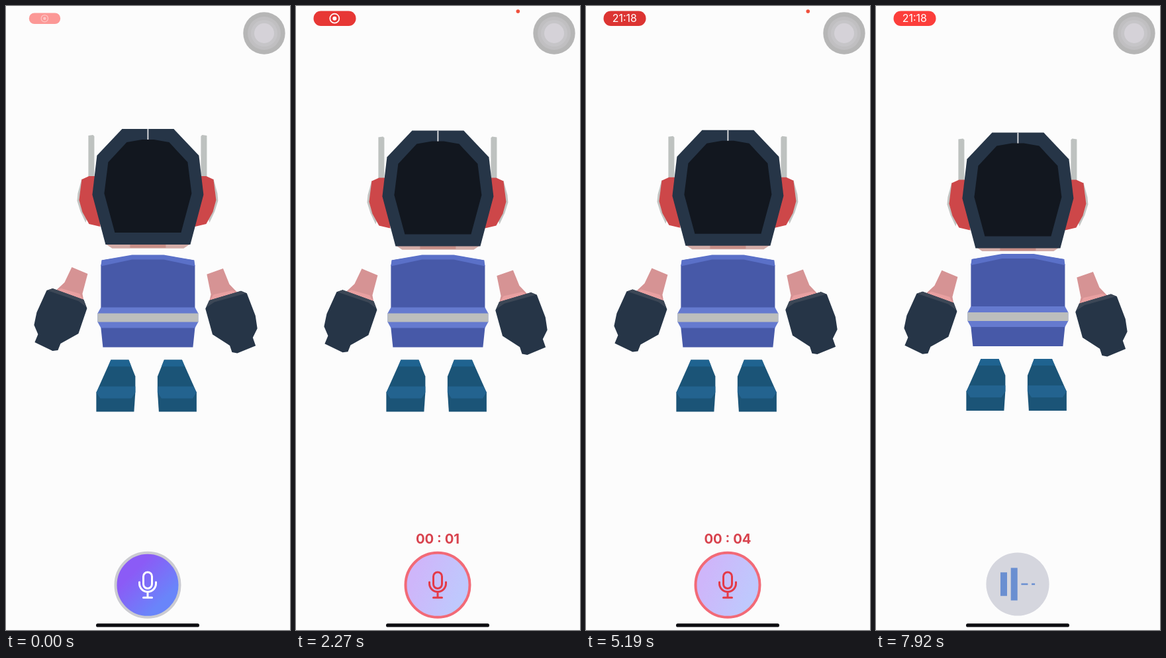
Animation of 429x939 px, one loop 7990 ms. Source, as an HTML page:

```html
<!DOCTYPE html>
<html lang="en">
<head>
<meta charset="utf-8">
<title>Voice robot</title>
<style>
  html, body { margin: 0; width: 100%; height: 100%; overflow: hidden; background: #fcfcfc; }
  svg { display: block; width: 100%; height: 100%; }
  text { font-family: Inter, "Liberation Sans", sans-serif; text-anchor: middle; }
</style>
</head>
<body>
<svg viewBox="0 0 429 939" xmlns="http://www.w3.org/2000/svg">
  <defs>
    <linearGradient id="violet" x1="0.15" y1="0.15" x2="0.85" y2="0.85">
      <stop offset="0.2" stop-color="#8b5bf6"/><stop offset="0.85" stop-color="#6985fa"/>
    </linearGradient>
    <linearGradient id="pale" x1="0" y1="0.3" x2="1" y2="0.7">
      <stop offset="0.15" stop-color="#ceb6fa"/><stop offset="0.85" stop-color="#bfc8fd"/>
    </linearGradient>
    <g id="mic" fill="none" stroke-width="3" stroke-linecap="round">
      <rect x="207.5" y="852" width="13" height="24.5" rx="6.5"/>
      <path d="M201.5 867v2a12.5 12.5 0 0 0 25 0v-2M214 882v8M207.5 890.3h13"/>
    </g>
  </defs>
  <rect width="429" height="939" fill="#fcfcfc"/>

  <g id="robot">
    <g id="body">
      <g id="leg">
        <path fill="#1b5477" d="M158 532h27l10 25v23l-2 30h-57v-29z"/>
        <path fill="#1f6390" d="M158 532h27l4 10h-35z"/>
        <path fill="#23638f" d="M141 572h54v9l-6 9h-47l-6-9z"/>
      </g>
      <use href="#leg" transform="translate(423.5) scale(-1 1)"/>
    </g>
    <g id="chin"></g>
    <g id="arms">
      <g id="arm">
        <path fill="#d69394" d="M99 392l24 10-8 30 2 11-43-15 14-13z"/>
        <path fill="#e9a0a1" d="M74 428l9-4 28 8 6 11z"/>
        <path fill="#263547" d="M61 427l9-3 47 17 5 13-13 38-27 15-4 10-8 1-27-13 5-12-6-14 4-19z"/>
        <path fill="#3c4756" d="M62 427l8-3 47 17 4 11-12-9z"/>
      </g>
      <use href="#arm" transform="rotate(3.4 342 445) translate(423.5 3) scale(-1 1)"/>
    </g>
    <g id="head">
      <g id="ear">
        <path fill="#bec2c0" d="M124 194l7-1 2 2v63h-9z"/>
        <path fill="#c3c5c3" d="M114 259l-6 22-1 11 5 16 8 17 10-35z"/>
        <path fill="#cd4749" d="M114 260l11-5h17v76l-17-4-10-18-5-18z"/>
      </g>
      <use href="#ear" transform="translate(427) scale(-1 1)"/>
    </g>
  </g>

  <g id="pill">
    <rect id="pillBg" x="26.5" y="7.5" width="64" height="22.5" rx="11"/>
    <g id="recIcon">
      <circle cx="58.3" cy="18.7" r="7" fill="none" stroke="#fff" stroke-width="1.7"/>
      <circle cx="58.3" cy="18.7" r="3" fill="#fff"/>
    </g>
    <text id="clock" x="58.3" y="24.4" font-size="16" fill="#fff">21:18</text>
  </g>
  <circle id="dot" cx="335.3" cy="8" r="2.8" fill="#f0503c"/>

  <g id="assist"></g>

  <g id="idle">
    <circle cx="214" cy="871.3" r="48.5" fill="url(#violet)" stroke="#cbcbd1" stroke-width="4"/>
    <use href="#mic" stroke="#fff"/>
  </g>
  <g id="rec">
    <circle cx="214" cy="871.3" r="48.5" fill="url(#pale)" stroke="#f26a77" stroke-width="4"/>
    <use href="#mic" stroke="#e43a48"/>
    <text id="timer" x="214" y="809" font-size="20.3" font-weight="700" fill="#d8434e"></text>
  </g>
  <g id="think">
    <circle cx="214" cy="870" r="47.6" fill="#d5d6de"/>
  </g>
  <rect x="136" y="929.3" width="156" height="5.2" rx="2.6" fill="#0d0d11"/>
</svg>

<script>
const LOOP = 7990, TAP = 1100, STOP = 5900, MID = 214;
const BLUE = '#4759a8', LIGHT = '#657acf';
const $ = id => document.getElementById(id);

function add(parent, tag, attrs) {
  const el = document.createElementNS('http://www.w3.org/2000/svg', tag);
  for (const k in attrs) el.setAttribute(k, attrs[k]);
  return $(parent).appendChild(el);
}

// Mirrored polygon from its right half, given as [distance from the middle, y].
function mirror(parent, fill, ...half) {
  const right = half.map(([dx, y]) => [MID + dx, y]);
  const left = half.map(([dx, y]) => [MID - dx, y]).reverse();
  add(parent, 'polygon', { fill, points: [...right, ...left].join(' ') });
}

mirror('body', BLUE, [24, 375], [69, 382], [71, 390], [71, 484], [68, 513]);
mirror('body', '#5a70c8', [24, 374], [70, 382], [71, 391], [24, 381]);
mirror('body', LIGHT, [71, 453], [76, 462], [76, 475], [71, 484]);
mirror('body', '#bcbebd', [76, 462], [76, 475]);

mirror('chin', '#d3aca7', [64, 350], [63, 358], [54, 364]);
mirror('chin', '#c68d86', [27, 356], [27, 363]);

mirror('head', '#263547', [39, 184], [77, 224], [84, 283], [64, 358]);
mirror('head', '#12171f', [9, 200], [32, 204], [60, 234], [66, 281], [50, 340]);
mirror('head', '#e4e4e6', [0.9, 184], [0.9, 200]);

['#b6b6b6', '#c0bfc1', '#c6c5c8', '#d5d2d8'].forEach((fill, i) =>
  add('assist', 'circle', { cx: 390, cy: 41, r: i ? 30 - 5 * i : 31.7, fill }));

const bars = [0, 1, 2, 3].map(i =>
  add('think', 'rect', { x: 188 + 15.7 * i, width: i < 3 ? 10 : 5, fill: '#6a8fd1' }));

const clamp = x => Math.min(1, Math.max(0, x));
const ramp = (t, start, len) => { const x = clamp((t - start) / len); return x * x * (3 - 2 * x); };
const show = (id, o) => $(id).setAttribute('opacity', o);
const move = (id, y, x = 0) => $(id).setAttribute('transform', `translate(${x} ${y})`);

// Float phase in degrees: the pace changes with the mode.
const PACE = [[0, 67], [TAP, 287], [2270, 414], [3860, 760], [5190, 1021], [LOOP, 1797]];
function floatY(t) {
  const i = PACE.findIndex(([end]) => t < end);
  const [t0, a] = PACE[i - 1], [t1, b] = PACE[i];
  const deg = a + (b - a) * (t - t0) / (t1 - t0);
  return -5 + 13 * Math.cos(deg * Math.PI / 180);
}

// Level bar: quick rise over 65 degrees, then a slow fall.
function level(deg) {
  const p = ((deg + 65) % 360 + 360) % 360 - 65;
  if (p < 0) return (1 - Math.cos(Math.PI * (p + 65) / 65)) / 2;
  return p < 180 ? (1 + Math.cos(p * Math.PI / 180)) / 2 : 0;
}

function draw(t) {
  const y = floatY(t);
  move('head', y + 0.5);
  move('arms', y * 0.9 + 0.5);
  move('chin', y * 0.82 + 0.2);
  move('robot', 0.5 - 1.5 * ramp(t, STOP, 400), 0.4);

  const grow = ramp(t, 0, 350), s = 0.74 + 0.26 * grow;
  $('pill').setAttribute('transform', `translate(58.4 18.7) scale(${s}) translate(-58.4 -18.7)`);
  show('pill', 0.52 + 0.48 * grow);
  const glow = grow < 1 ? 1 - grow : 0.5 - 0.5 * Math.cos((t - 770) / 2030 * 2 * Math.PI);
  $('pillBg').setAttribute('fill', `rgb(${208 + 44 * glow},${48 + 14 * glow},${47 + 12 * glow})`);
  const swap = ramp(t, 3000, 200);
  show('recIcon', (0.45 + 0.55 * grow) * (1 - swap));
  show('clock', swap);
  show('dot', ramp(t, 1450, 150) * (1 - ramp(t, 6200, 150)));

  const off = ramp(t, STOP, 150);
  show('idle', t < TAP + 150 ? 1 : 0);
  show('rec', ramp(t, TAP, 150) * (1 - off));
  show('think', off);
  const sec = Math.max(0, Math.floor((t - TAP) / 1000));
  $('timer').textContent = '00 : 0' + Math.min(sec, 4);

  bars.forEach((bar, i) => {
    const h = 2.5 + 46.5 * level((t - 7920) * 0.2935 + 65 * (1 - i));
    bar.setAttribute('y', 870 - h / 2);
    bar.setAttribute('height', h);
  });
}

const start = performance.now();
function tick() {
  draw((performance.now() - start) % LOOP);
  requestAnimationFrame(tick);
}
tick();
</script>
</body>
</html>
```
